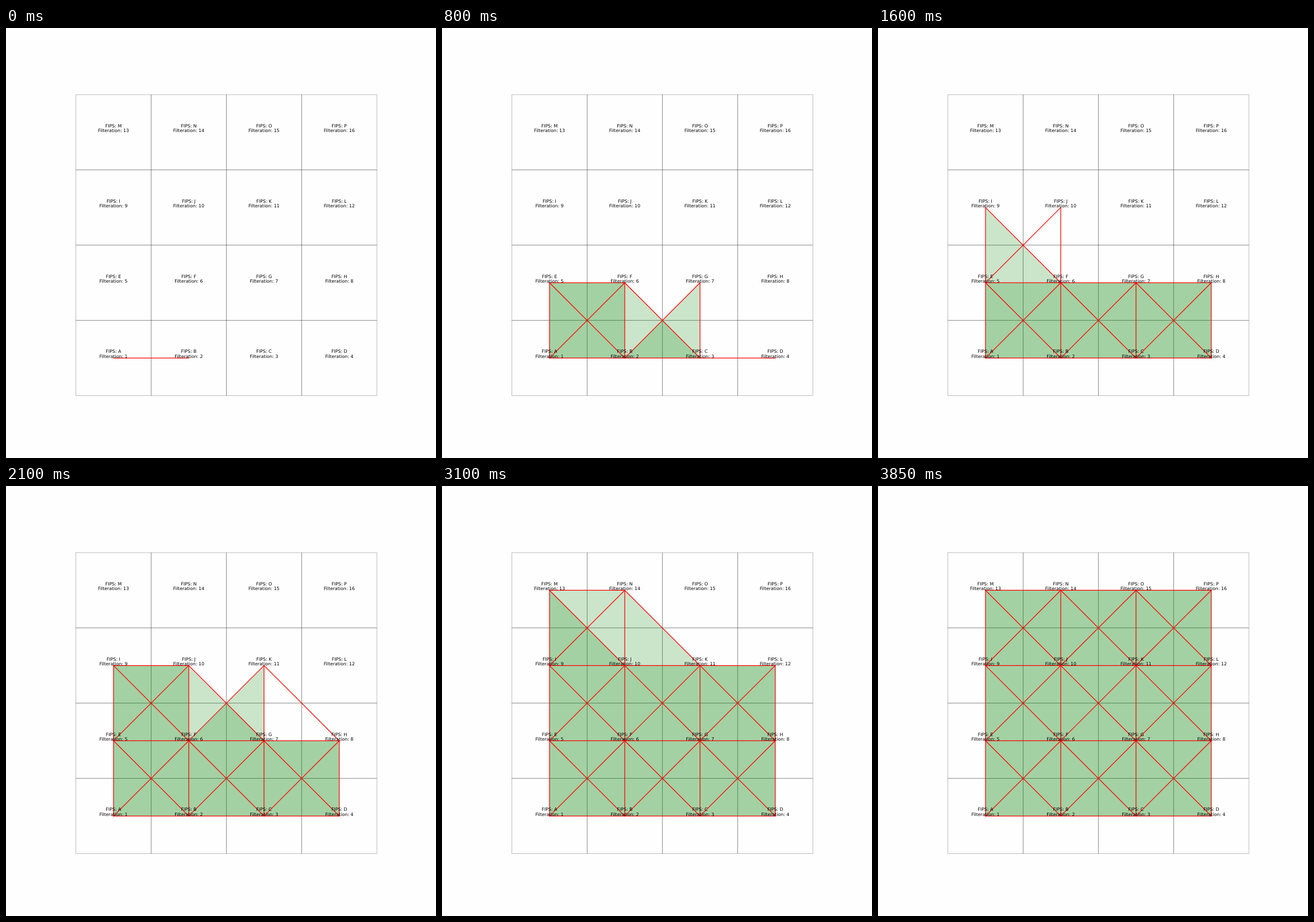
Write an HTML page that moves like this. It is 748x748 px and loops after 3.9 s.

```html
<!DOCTYPE html>
<html lang="en">
<head>
<meta charset="utf-8">
<title>Simplicial filtration on a grid</title>
<style>
  html, body { margin: 0; width: 100%; height: 100%; overflow: hidden; background: #fefefe; }
  svg { display: block; width: 748px; height: 748px; }
  .cell { fill: none; stroke: #000; stroke-opacity: .3; stroke-width: .85; }
  .face { fill: #008000; fill-opacity: .2; }
  .edge { stroke: #f00; stroke-width: 1.25; stroke-linecap: square; }
  text {
    font: 7.8px "DejaVu Sans", sans-serif;
    text-anchor: middle;
    text-rendering: geometricPrecision;
  }
</style>
</head>
<body>
<svg id="stage" viewBox="0 0 748 748">
  <g id="cells"></g>
  <g id="faces"></g>
  <g id="edges"></g>
  <g id="labels"></g>
</svg>
<script>
  const N = 4, CELL = 130.9, LEFT = 121.55, BOTTOM = 639.54;
  const STEP = 50, LINE = 8.65;

  const col = v => v % N;
  const row = v => Math.floor(v / N);
  const px = v => LEFT + (col(v) + 0.5) * CELL;
  const py = v => BOTTOM - (row(v) + 0.5) * CELL;
  const near = (a, b) => Math.abs(col(a) - col(b)) < 2 && Math.abs(row(a) - row(b)) < 2;

  function add(layer, tag, attrs, text = '') {
    const el = document.createElementNS('http://www.w3.org/2000/svg', tag);
    for (const key in attrs) el.setAttribute(key, attrs[key]);
    el.textContent = text;
    document.getElementById(layer).append(el);
    return el;
  }

  const addEdge = (a, b) => add('edges', 'line',
    { class: 'edge', x1: px(a), y1: py(a), x2: px(b), y2: py(b) });

  const addFace = (...vs) => add('faces', 'polygon',
    { class: 'face', points: vs.map(v => px(v) + ',' + py(v)).join(' ') });

  // Simplices enter by highest vertex, then in reverse lexicographic order.
  const simplices = [];
  for (let v = 0; v < N * N; v++) {
    const x = px(v), y = py(v);
    add('cells', 'rect',
      { class: 'cell', x: x - CELL / 2, y: y - CELL / 2, width: CELL, height: CELL });
    add('labels', 'text', { x, y: y - LINE }, 'FIPS: ' + String.fromCharCode(65 + v));
    add('labels', 'text', { x, y }, 'Filteration: ' + (v + 1));

    for (let u = 0; u < v; u++) {
      if (!near(u, v)) continue;
      simplices.push(addEdge(u, v));
      for (let w = 0; w < u; w++) {
        if (near(w, u) && near(w, v)) simplices.push(addFace(w, u, v));
      }
    }
  }

  let shown = -1;
  function draw() {
    const last = Math.floor(performance.now() / STEP) % simplices.length;
    if (last !== shown) {
      simplices.forEach((el, i) => { el.style.display = i <= last ? '' : 'none'; });
      shown = last;
    }
    requestAnimationFrame(draw);
  }
  draw();
</script>
</body>
</html>
```
